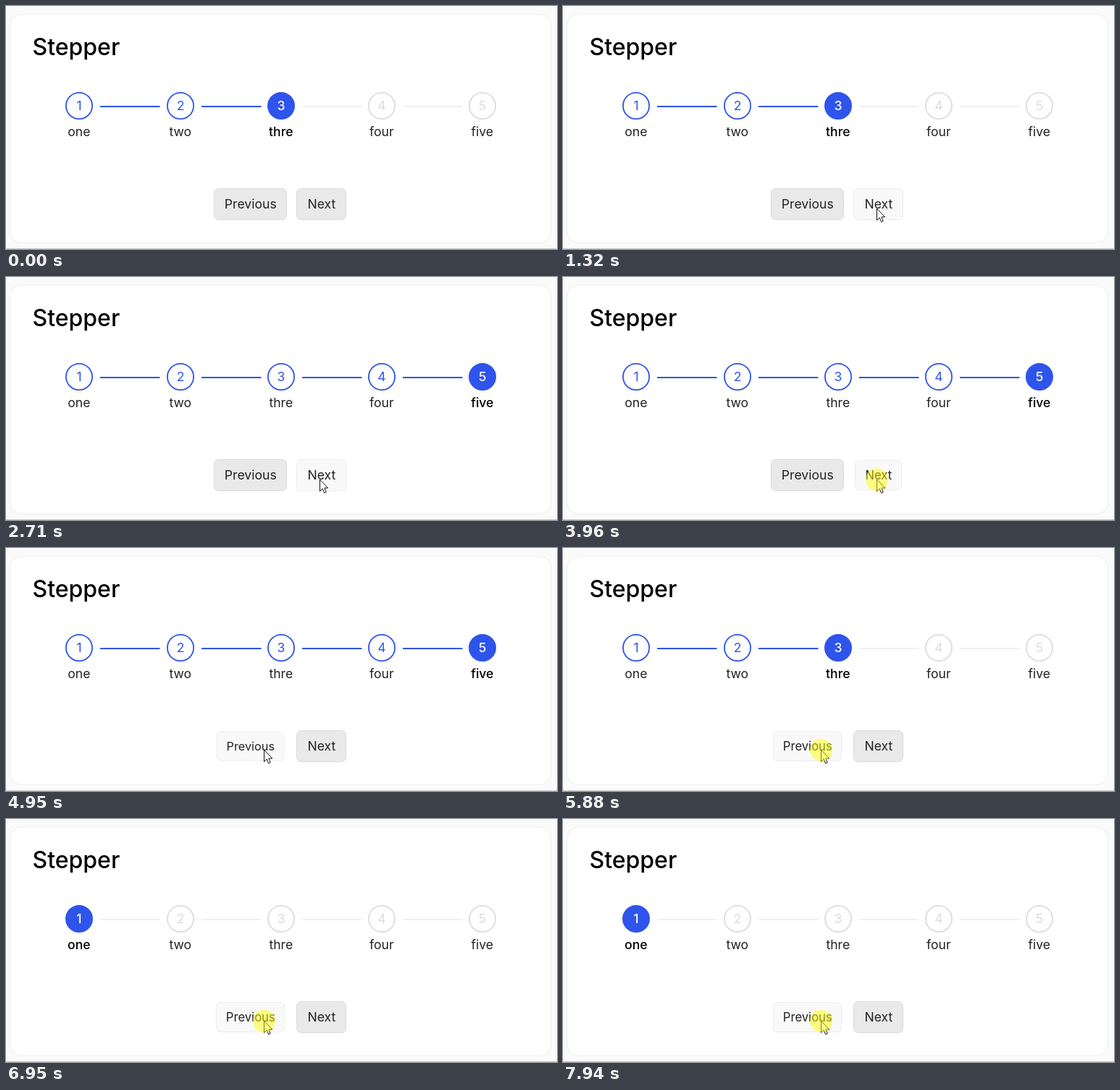
An HTML page for the animation above (8000 ms loop, 761 px wide and 336 px high).

```html
<!DOCTYPE html>
<html lang="en">
<head>
<meta charset="utf-8">
<title>Stepper</title>
<style>
  html, body { margin: 0; width: 100%; height: 100%; overflow: hidden; background: #fafafa; }
  svg { display: block; width: 761px; height: 336px; }
  text { font: 400 17.6px Inter, sans-serif; font-optical-sizing: none; fill: #222; text-anchor: middle; }
  .title { font-size: 32px; font-weight: 500; fill: #000; text-anchor: start; }
  .ring { fill: #fff; stroke: #dcdcdc; stroke-width: 1.8; }
  .num { fill: #dcdcdc; }
  .bar { fill: #f0f0f0; }
  .done .ring { stroke: #2f54eb; }
  .done .num { fill: #2f54eb; }
  .done .bar { fill: #2f54eb; }
  .active .ring { fill: #2f54eb; stroke: #2f54eb; }
  .active .num { fill: #fff; font-weight: 500; }
  .active .label { fill: #000; font-weight: 500; }
  .button rect { fill: #e9e9e9; stroke: #dbdbdb; }
  .button.hover rect { fill: #f9f9f9; stroke: #ebebeb; }
</style>
</head>
<body>
<svg id="stage" viewBox="0 0 761 336">
  <rect width="761" height="336" fill="#fafafa"/>
  <rect x="5.5" y="11.5" width="747" height="316" rx="16" fill="#fff" stroke="#f2f2f2" stroke-width="1.5"/>
  <rect y="335" width="761" height="1" fill="#c8c8c8"/>
  <text class="title" x="36.5" y="68">Stepper</text>
</svg>
<script>
const LOOP = 8000;
const stage = document.getElementById("stage");

function add(parent, tag, attrs, content) {
  const el = document.createElementNS("http://www.w3.org/2000/svg", tag);
  for (const key in attrs) el.setAttribute(key, attrs[key]);
  if (content) el.textContent = content;
  parent.appendChild(el);
  return el;
}

const steps = ["one", "two", "thre", "four", "five"].map((label, i) => {
  const g = add(stage, "g", {});
  const x = 101 + Math.round(i * 139.25 + 0.4);
  if (i < 4) add(g, "rect", { class: "bar", x: x + 29, y: 138, width: 82.5, height: 2, rx: 0.5 });
  add(g, "circle", { class: "ring", cx: x, cy: 138, r: 18.1 });
  add(g, "text", { class: "num", x, y: 144.3 }, String(i + 1));
  add(g, "text", { class: "label", x: x - 0.2, y: 180 }, label);
  return g;
});

function makeButton(label, x, width) {
  const g = add(stage, "g", {});
  add(g, "rect", { x: x + 0.5, y: 252.5, width: width - 1, height: 43, rx: 6 });
  add(g, "text", { x: x + width / 2 + 0.3, y: 280 }, label);
  return { g, x, width };
}

const previous = makeButton("Previous", 287, 101);
const next = makeButton("Next", 401, 69);
const cursor = add(stage, "path", {
  d: "M0 0V16.2L3.7 12.7 6.2 18.6 8.7 17.5 6.3 11.8H11.2Z",
  fill: "#fff", stroke: "#111", "stroke-width": 1, "stroke-linejoin": "round"
});
const halo = add(stage, "circle", { r: 15.5, fill: "#ff0", "fill-opacity": 0.48 });

// start, duration, number of poses, direction
const presses = [
  [1780, 200, 4, 1], [2440, 270, 4, 1], [3300, 200, 4, 1], [3900, 260, 5, 1],
  [4880, 200, 4, -1], [5350, 200, 4, -1], [5880, 140, 3, -1], [6350, 200, 4, -1],
  [6950, 200, 4, -1], [7480, 190, 4, -1], [7940, 200, 4, -1]
];

const mix = (a, b, k) => a + (b - a) * k;
const ease = k => k * k * (3 - 2 * k);

function pose(t, start, duration, count) {
  return Math.min(count - 1, Math.floor((t - start) / (duration / (count - 1)) + 1e-6));
}

function pointer(t) {
  if (t < 4360) {
    const k = pose(t, 850, 470, 8) / 7;
    const out = 1 - (1 - k) ** 2;
    return [mix(516, 433.5, out), mix(326, 280, out)];
  }
  const k = ease((pose(t, 4360, 450, 8) + 1) / 8);
  return [mix(433.5, 356.5, k), mix(280, 279.2, k)];
}

function pressScale(i, count) {
  if (i === count - 1) return 1;
  if (i === count - 2) return 0.965;
  return i === 0 ? 0.945 : 0.925;
}

function drawButton(button, x, y, visible, scale) {
  const hover = visible && x >= button.x && x <= button.x + button.width && y >= 252 && y <= 296;
  const cx = button.x + button.width / 2;
  button.g.setAttribute("class", hover ? "button hover" : "button");
  button.g.setAttribute("transform", `translate(${cx} 274) scale(${scale}) translate(${-cx} -274)`);
}

function draw(t) {
  let current = 3, scale = 1, lit = false, direction = 0;
  for (const [start, duration, count, dir] of presses) {
    if (t < start) break;
    const i = pose(t, start, duration, count);
    if (i >= count - 2) current = Math.max(1, Math.min(5, current + dir));
    scale = pressScale(i, count);
    lit = i === 0;
    direction = dir;
  }

  steps.forEach((g, i) => {
    const n = i + 1;
    g.setAttribute("class", n < current ? "done" : n === current ? "active" : "");
  });

  const visible = t >= 850;
  const [x, y] = pointer(t);
  drawButton(previous, x, y, visible, direction < 0 ? scale : 1);
  drawButton(next, x, y, visible, direction > 0 ? scale : 1);
  cursor.setAttribute("transform", `translate(${x} ${y})`);
  cursor.setAttribute("visibility", visible ? "visible" : "hidden");
  halo.setAttribute("cx", x);
  halo.setAttribute("cy", y);
  halo.setAttribute("visibility", lit ? "visible" : "hidden");
}

const began = performance.now();
function tick() {
  draw((performance.now() - began) % LOOP);
  requestAnimationFrame(tick);
}
draw(0);
requestAnimationFrame(tick);
</script>
</body>
</html>
```
